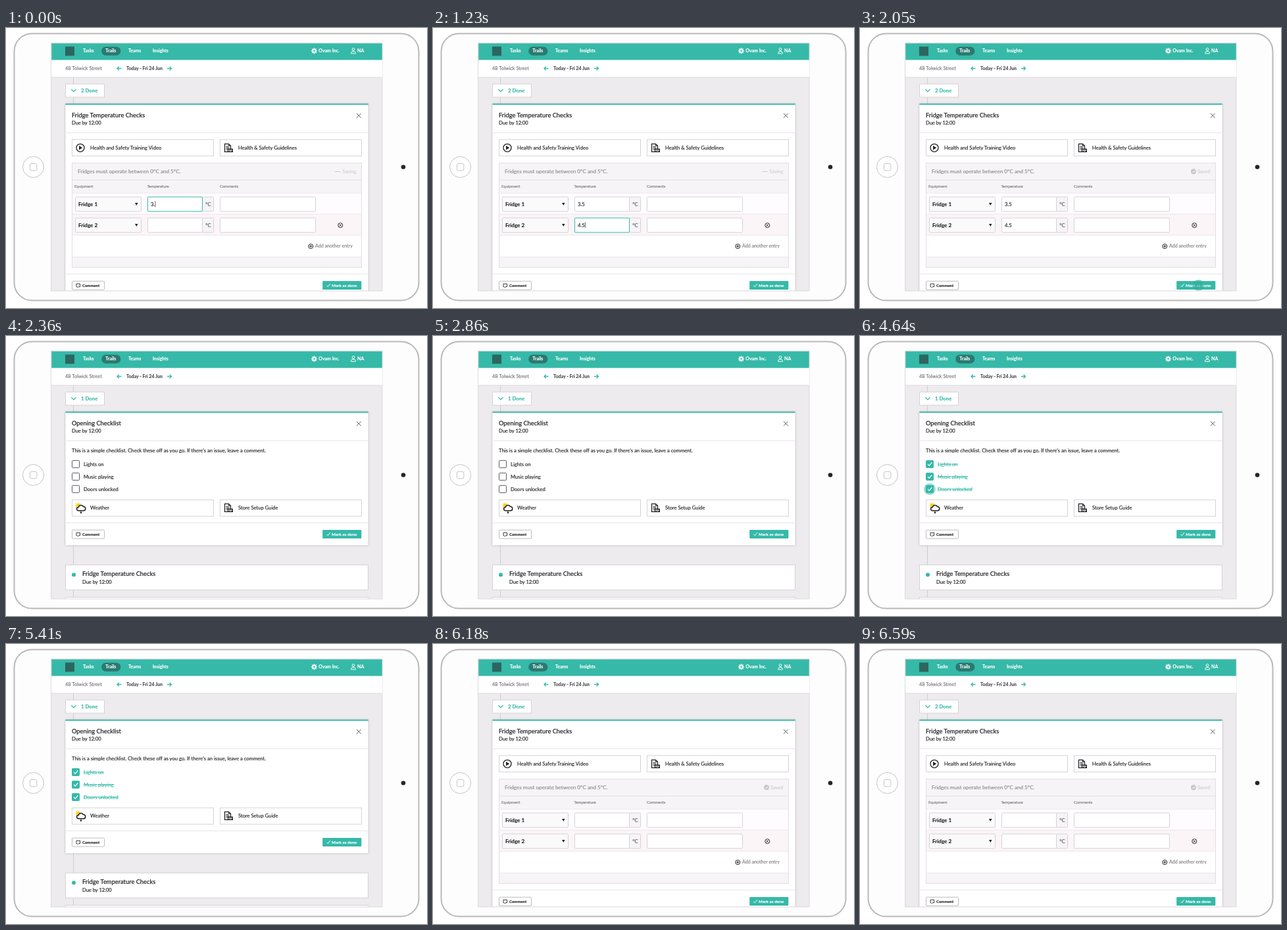
Write an HTML page that moves like this. It is 640 px wide and 426 px high and loops after 6630 ms.

```html
<!DOCTYPE html>
<html lang="en">
<head>
<meta charset="utf-8">
<title>Daily checks on a tablet</title>
<style>
  html, body { margin: 0; width: 100%; height: 100%; overflow: hidden; background: #fff; }
  svg { display: block; width: 100%; height: 100%; }
  text {
    font-family: Lato, "Open Sans", sans-serif; white-space: pre;
    fill: currentColor; stroke: currentColor; stroke-width: .15px;
  }
  .raised { filter: drop-shadow(0 .5px 1.5px rgba(60, 50, 65, .35)); }
</style>
</head>
<body>
<svg id="stage" viewBox="0 0 640 426" xmlns="http://www.w3.org/2000/svg"></svg>
<script>
const LOOP = 6630;
const TEAL = '#36b9a8', INK = '#222124', BORDER = '#d5d2d6', PANEL = '#f7f4f7', BOX_EDGE = '#5c5a60';

const rect = (x, y, w, h, fill = '#fff', stroke = 'none', extra = '') =>
  `<rect x="${x}" y="${y}" width="${w}" height="${h}" fill="${fill}" stroke="${stroke}" ${extra}/>`;
const path = (d, stroke = INK, width = 1, fill = 'none', extra = '') =>
  `<path d="${d}" stroke="${stroke}" stroke-width="${width}" fill="${fill}" ${extra}/>`;
const circle = (x, y, r, fill, stroke = 'none', extra = '') =>
  `<circle cx="${x}" cy="${y}" r="${r}" fill="${fill}" stroke="${stroke}" ${extra}/>`;
const label = (x, y, str, size, color = INK, weight = 400, extra = '') =>
  `<text x="${x}" y="${y}" font-size="${size}" color="${color}" font-weight="${weight}" ${extra}>${str}</text>`;
const group = (id, body, extra = '') => `<g id="${id}" ${extra}>${body}</g>`;

const clamp = v => Math.max(0, Math.min(1, v));
const ease = v => { v = clamp(v); return v * v * (3 - 2 * v); };

function pdfIcon(x, y) {
  return path(`M${x} ${y}h6l3 3v9h-9z`, INK, 1.3, '#fff') + path(`M${x + 6} ${y}v3h3`) +
    path(`M${x + 2} ${y + 4}h4M${x + 2} ${y + 6}h5M${x + 2} ${y + 8}h5`, INK, 1) +
    rect(x + 4.2, y + 7.3, 8.3, 5.4, INK) +
    label(x + 5.2, y + 11.3, 'PDF', 3.3, '#fff', 700);
}

function weatherIcon() {
  const rays = Array.from({ length: 8 }, (_, i) => {
    const a = i * Math.PI / 4, c = Math.cos(a), s = Math.sin(a);
    return `M${109.8 + 3.6 * c} ${258 + 3.6 * s}L${109.8 + 5 * c} ${258 + 5 * s}`;
  }).join('');
  return circle(109.8, 258, 3.3, '#f6d21f') + path(rays, '#f6d21f', 1.1) +
    path('M110.3 265.8a2.7 2.7 0 0 1 0-5.4a3.9 3.9 0 0 1 7.2-.8a3.1 3.1 0 0 1 .3 6.2z', INK, 1.5, '#fff') +
    path('M114 266.3q-2.4 3.5 0 3.7q2.4-.2 0-3.7z', 'none', 0, INK);
}

const playIcon = circle(113, 182.3, 6, '#fff', INK, 'stroke-width="1.3"') +
  path('M111 179.1v6.4l5.2-3.2z', 'none', 0, INK);

const linkBox = (x, y, str) =>
  rect(x + .5, y + .5, 215, 25, '#fff', BORDER) + label(x + 28, y + 15.7, str, 7.6);

function cardShell(bottom, title) {
  return rect(90.3, 115.3, 460.4, bottom - 115.3, '#fff', 'none', 'class="raised"') +
    rect(90.3, 115, 460.4, 1.8, TEAL) +
    path('M91 159.3H550', '#e6e3e7') +
    label(100, 135.6, title, 9.3, INK, 500) + label(100, 147, 'Due by 12:00', 7.5) +
    path('M533 130l6.6 6.6M539.6 130l-6.6 6.6', '#59575b', 1);
}

function cardFooter(y) {
  return path(`M91 ${y - 10.5}H550`, '#e6e3e7') +
    rect(100.5, y + .5, 49, 13, '#fff', '#bdbabf', 'rx="1"') +
    path(`M107 ${y + 4.5}h5.5v4.5h-2l-1.2 1.2l-1.2-1.2h-1.1z`, INK, .9) +
    label(116, y + 9.3, 'Comment', 6, INK, 700) +
    rect(481.2, y + .2, 59.1, 13.2, TEAL, 'none', 'rx="1"') +
    path(`M487.3 ${y + 7}l2 2l3.6-4.6`, '#fff', 1) +
    label(495, y + 9.2, 'Mark as done', 6.4, '#fff', 700);
}

function fridgeRow(n, y) {
  const field = `rx="1.5"`;
  return rect(105.5, y - 10.5, 100, 22, '#fbfafb', BORDER, field) +
    label(110, y + 3.2, `Fridge ${n}`, 8.1, INK, 700) +
    path(`M196 ${y - 1.4}h4.6l-2.3 4z`, 'none', 0, INK) +
    rect(298.5, y - 10.5, 17, 22, PANEL, BORDER, field) +
    label(303.3, y + 3.2, '°C', 7.8, '#555257') +
    rect(215.5, y - 10.5, 83, 22, '#fff', BORDER, `id="input${n}" rx="1"`) +
    label(220, y + 3, '', 7.8, INK, 400, `id="value${n}"`) +
    rect(325.5, y - 10.5, 145, 22, '#fff', BORDER, field);
}

const fridgeCard = cardShell(420, 'Fridge Temperature Checks') +
  linkBox(100, 169.2, 'Health and Safety Training Video') + playIcon +
  linkBox(325, 169.2, 'Health &amp; Safety Guidelines') + pdfIcon(332.5, 176.3) +
  rect(100.5, 205.3, 440, 159, PANEL, '#e2dee3') +
  path('M101 231.3H540', '#e3dfe4') +
  label(109, 221, 'Fridges must operate between 0°C and 5°C.', 8.15, '#8c898e') +
  [['Equipment', 104], ['Temperature', 214.5], ['Comments', 325]]
    .map(([s, x]) => label(x, 243, s, 6, '#7d7a80')).join('') +
  rect(101, 251.2, 439, 32, '#fefcfe') + rect(101, 283.2, 439, 32, '#fbf5f8') +
  rect(101, 315.2, 439, 33, '#fff') +
  path('M101 251.2H540M101 283.2H540M101 315.2H540M101 348.3H540', '#ece7ec') +
  fridgeRow(1, 267.5) + fridgeRow(2, 299.5) +
  circle(508.3, 300.2, 3.5, '#fff', INK) + path('M506.8 298.7l3 3M509.8 298.7l-3 3', INK, 1) +
  circle(463.3, 332.1, 3.5, '#fff', INK) + path('M461.3 332.1h4M463.3 330.1v4', INK, 1) +
  label(470, 334.4, 'Add another entry', 7.1, '#828085') +
  group('saving', path('M500 218.5h9', '#cdc9ce', 1, 'none', 'id="dash"') +
    label(511.5, 221, 'Saving', 7.3, '#d2ced3')) +
  group('saved', circle(507, 218.3, 4, '#cac6cb') +
    path('M505.1 218.4l1.4 1.5l2.6-3', '#fff', 1) + label(513, 221, 'Saved', 7.4, '#cfcbd0')) +
  path('', INK, .7, 'none', 'id="caret"') + cardFooter(384.7);

const tasks = ['Lights on', 'Music playing', 'Doors unlocked'];
const checklistCard = cardShell(318.5, 'Opening Checklist') +
  label(100, 177.3, "This is a simple checklist. Check these off as you go. If there's an issue, leave a comment.", 7.67) +
  tasks.map((name, i) => {
    const y = 194.9 + 19 * i;
    return circle(106, y, 9, TEAL, 'none', `id="halo${i}"`) +
      rect(100.5, y - 5.5, 11, 11, '#fff', BOX_EDGE, `id="box${i}" rx="1"`) +
      path(`M103 ${y}l2.3 2.5l4-5`, '#fff', 1.2, 'none', `id="tick${i}"`) +
      label(118, y + 2.8, name, 7.65, INK, 400, `id="task${i}"`);
  }).join('') +
  linkBox(100, 248.7, 'Weather') + weatherIcon() +
  linkBox(325, 248.7, 'Store Setup Guide') + pdfIcon(332.5, 255.3) +
  cardFooter(294.7);

const nextCard = rect(90.5, 348.3, 460, 38, '#fff', BORDER) +
  circle(103, 363.3, 3, TEAL) +
  label(116, 365.2, 'Fridge Temperature Checks', 9.3, INK, 500) +
  label(116, 376.6, 'Due by 12:00', 7.5);

const gear = path('M468.5 30.2v9M464 34.7h9M465.3 31.5l6.4 6.4M471.7 31.5l-6.4 6.4', '#fff', 1.5) +
  circle(468.5, 34.7, 3, '#fff') + circle(468.5, 34.7, 1.3, TEAL);
const person = circle(528, 32.4, 1.9, 'none', '#fff') +
  path('M524.6 38.8v-1.3q.3-1.6 2.4-2h2q2.1.4 2.4 2v1.3z', '#fff', 1);

const topBar = rect(69, 48, 503, 27, '#fff') +
  rect(69.3, 23.4, 502.4, 25.2, TEAL) + rect(90, 28.3, 14, 14, '#2c665f') +
  rect(145.2, 28.4, 29.2, 13.4, '#2a7a71', 'none', 'rx="6.7"') +
  [['Tasks', 117], ['Trails', 151.3], ['Teams', 186], ['Insights', 223]]
    .map(([s, x]) => label(x, 37.3, s, 6.9, '#fff', 700)).join('') +
  gear + label(475.3, 37.3, 'Ovam Inc.', 7, '#fff', 700) +
  person + label(534, 37.3, 'NA', 7, '#fff', 700) +
  path('M69 75H572', '#dedbdf') +
  label(90, 64.2, '48 Tolwick Street', 7.4, '#77747a') +
  label(183, 64.2, 'Today - Fri 24 Jun', 7.05, '#4b494e', 700) +
  path('M175.5 61.5h-6.5M171.8 58.7l-2.8 2.8l2.8 2.8M245 61.5h6.5M248.7 58.7l2.8 2.8l-2.8 2.8', TEAL, 1.3);

const doneBox = rect(90.5, 85.2, 59, 20, '#fff', BORDER) +
  path('M99.3 93.3l3.6 3.6l3.6-3.6', TEAL, 1.3) +
  label(114, 97.8, '', 7.8, TEAL, 700, 'id="doneCount"');

document.getElementById('stage').innerHTML =
  `<clipPath id="screen">${rect(69, 23, 503, 376.3)}</clipPath>` +
  rect(12.5, 8.5, 615, 406, '#fefdfe', '#b9b8ba', 'rx="27" stroke-width="2"') +
  circle(41.5, 211.5, 16, '#fff', '#c4c2c5') +
  rect(36.3, 206.3, 10.6, 10.6, '#fff', '#c4c2c5', 'rx="2.5"') +
  circle(604, 211.5, 3.3, '#252427') +
  rect(68.5, 22.8, 503.5, 377.2, '#edebee', '#dcd9dd') +
  group('content',
    path('M102.5 75V399', '#cfccd0') + doneBox +
    group('upcoming', rect(90.5, 397.5, 460, 10, '#fff', BORDER) + nextCard) +
    group('checklist', checklistCard) + group('fridge', fridgeCard) +
    circle(0, 0, 8.5, '#2fae9d', 'none', 'id="press"') + topBar,
    'clip-path="url(#screen)"');

const el = Object.fromEntries([...document.querySelectorAll('[id]')].map(e => [e.id, e]));
const set = (id, attrs) => { for (const k in attrs) el[id].setAttribute(k, attrs[k]); };
const setText = (id, str) => { if (el[id].textContent !== str) el[id].textContent = str; };
const pulse = (t, from, to) => ease((t - from) / 100) * ease((to - t) / 100);

const CUT = 2330, OPEN = 5820;
const TICKS = [3300, 3960, 4600];

function typed(t, steps) {
  return steps.reduce((value, [at, str]) => t >= at ? str : value, '');
}

function updateFridge(t) {
  const filling = t < CUT;
  const focus = !filling ? 0 : t < 520 ? 1 : t >= 600 && t < 1480 ? 2 : 0;
  setText('value1', filling ? typed(t, [[0, '3.'], [130, '3.5']]) : '');
  setText('value2', filling ? typed(t, [[850, '4'], [980, '4.'], [1110, '4.5']]) : '');
  for (const n of [1, 2]) set('input' + n, { stroke: focus === n ? TEAL : BORDER });
  if (focus) {
    const x = 220.5 + el['value' + focus].getComputedTextLength();
    set('caret', { d: `M${x} ${focus === 1 ? 263.3 : 295.3}v9` });
  }
  set('caret', { opacity: focus ? 1 : 0 });
  const saving = t < 1720;
  set('saving', { opacity: saving ? 1 : 0 });
  set('saved', { opacity: saving ? 0 : 1 });
  set('dash', { 'stroke-dasharray': '8 1.5', 'stroke-dashoffset': -(t % 600) / 600 * 9.5 });
}

function updateChecklist(t) {
  TICKS.forEach((at, i) => {
    const on = t >= at;
    set('halo' + i, { opacity: .5 * pulse(t, at - 200, at + 130) });
    set('box' + i, { fill: on ? TEAL : '#fff', stroke: on ? TEAL : BOX_EDGE });
    set('tick' + i, { opacity: on ? 1 : 0 });
    set('task' + i, { color: on ? TEAL : INK, 'text-decoration': on ? 'line-through' : 'none' });
  });
}

function draw(t) {
  const first = t < CUT;
  const p = first ? 1 : ease((t - OPEN) / 320);
  setText('doneCount', p > .5 ? '2 Done' : '1 Done');
  set('fridge', { opacity: p, transform: `translate(0 ${233 * (1 - p)})` });
  set('checklist', { opacity: 1 - p });
  set('upcoming', { opacity: 1 - p, transform: `translate(0 ${-233 * p})` });
  updateFridge(t);
  updateChecklist(t);
  set('press', {
    cx: 514.5, cy: first ? 391.5 : 301.5,
    opacity: .6 * (first ? pulse(t, 1920, 2230) : pulse(t, 5540, 5810))
  });
}

const start = performance.now();
function tick() {
  draw((performance.now() - start) % LOOP);
  requestAnimationFrame(tick);
}
tick();
</script>
</body>
</html>
```
